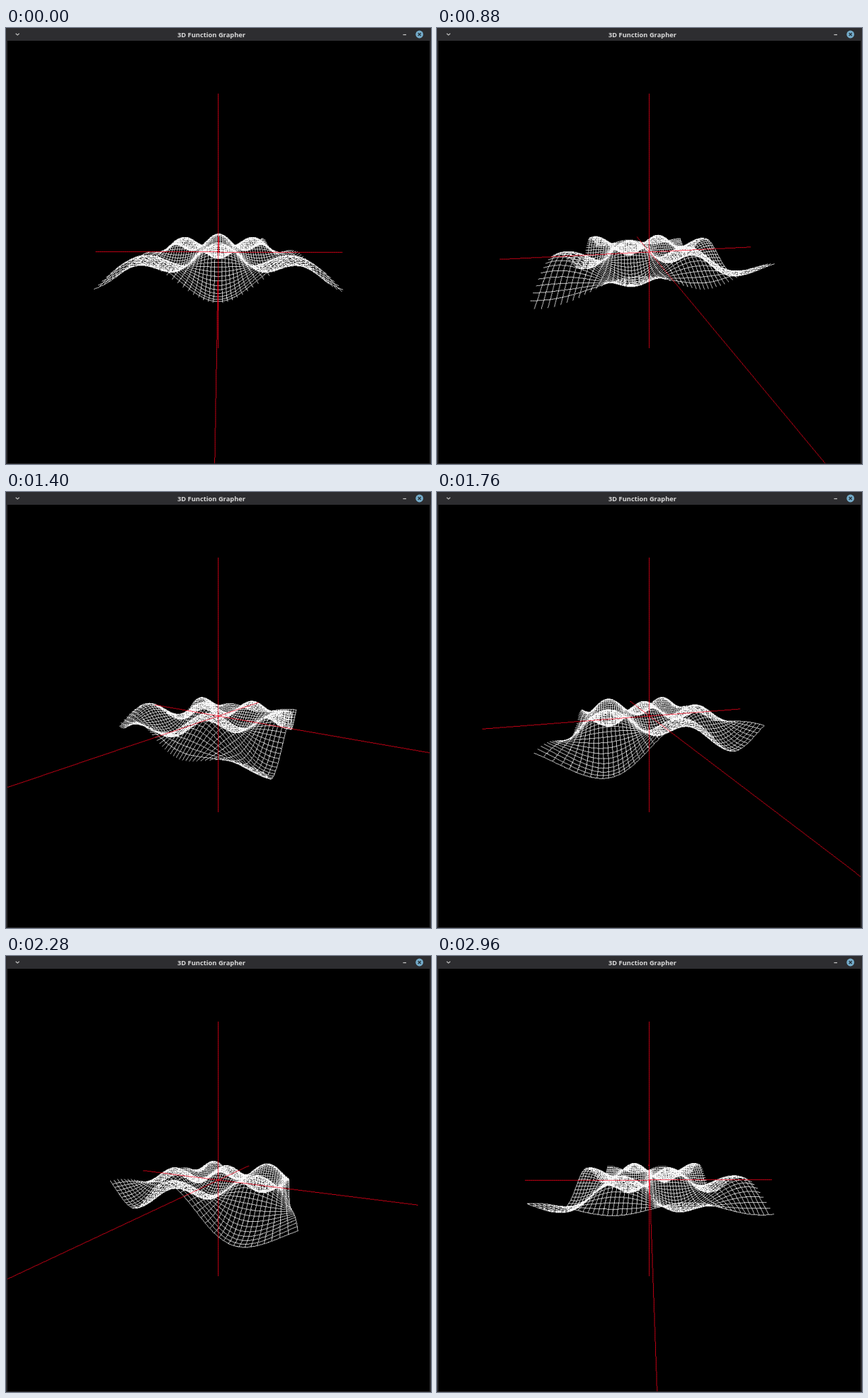
Animation of 600 by 615 pixels, one loop 3000 ms. Source, as an HTML page with a canvas:

```html
<!DOCTYPE html>
<html lang="en">
<head>
<meta charset="utf-8">
<title>3D Function Grapher</title>
<style>
  html, body { margin: 0; width: 100%; height: 100%; overflow: hidden; background: #2d2d30; }
  #stage { position: relative; width: 600px; height: 615px; overflow: hidden; background: #2d2d30; }
  canvas { position: absolute; left: 2px; top: 18px; }
  svg { position: absolute; left: 0; top: 0; }
  text { font: 700 9.3px "Open Sans", "Noto Sans", sans-serif; fill: #dadada; }
</style>
</head>
<body>
<div id="stage">
  <canvas id="view" width="596" height="596"></canvas>
  <svg width="600" height="18" viewBox="0 0 600 18">
    <path d="M13.7 7.8 L16.2 10 L18.7 7.8" fill="none" stroke="#bdbdbd" stroke-width="1.2"/>
    <text x="290" y="13" text-anchor="middle">3D Function Grapher</text>
    <path d="M560.5 9.5 H565" stroke="#c8c8c8" stroke-width="1.2"/>
    <circle cx="583.7" cy="9" r="5.4" fill="#74abc9"/>
    <path d="M581.7 7 l4 4 m0 -4 l-4 4" stroke="#26323a" stroke-width="1.3"/>
  </svg>
</div>
<script>
const LOOP = 3000, STEP = 40;
const SIZE = 596;              // size on the page
const GRID = 800;              // size the hard-edged lines are plotted at
const SCALE = SIZE / GRID;
const CX = GRID / 2 - 0.01, CY = GRID / 2;
const FOCAL = GRID / 2 / Math.tan(Math.PI / 3);
const DIST = 9.895, PITCH = Math.atan(0.25);
const SP = Math.sin(PITCH), CP = Math.cos(PITCH);
const EXTENT = 5, CELL = 0.2, CELLS = 50, AXIS = 10;
const WHITE = 1, RED = 2;
const RGB = { [WHITE]: [255, 255, 255], [RED]: [255, 0, 26] };

// Turn around the vertical axis: [ms, degrees]
const TURN = [[0, -0.25], [400, -36.85], [880, -78.59], [1400, -125.65],
              [1760, -162.3], [2280, -207.35], [2960, -269.5]];

const ctx = document.getElementById("view").getContext("2d");
const image = ctx.createImageData(SIZE, SIZE);
const sums = new Float32Array(SIZE * SIZE * 4);
const plot = new Uint8Array(GRID * GRID);

const height = (a, b) => Math.sin(a) * Math.cos(b);

function turnAt(ms) {
  let i = 1;
  while (i < TURN.length - 1 && ms > TURN[i][0]) i++;
  const [t0, d0] = TURN[i - 1], [t1, d1] = TURN[i];
  return (d0 + (d1 - d0) * (ms - t0) / (t1 - t0)) * Math.PI / 180;
}

function projector(turn) {
  const s = Math.sin(turn), c = Math.cos(turn);
  return (a, b, h) => {
    const x = a * s + b * c, z = a * c - b * s;
    const w = FOCAL / (DIST - z * CP - h * SP);
    return [CX + x * w, CY + (z * SP - h * CP) * w];
  };
}

function line(p, q, color) {
  const dx = q[0] - p[0], dy = q[1] - p[1];
  const n = Math.max(1, Math.ceil(Math.max(Math.abs(dx), Math.abs(dy))));
  for (let i = 0; i <= n; i++) {
    const x = Math.floor(p[0] + dx * i / n), y = Math.floor(p[1] + dy * i / n);
    if (x >= 0 && y >= 0 && x < GRID && y < GRID) plot[y * GRID + x] = color;
  }
}

function add(x, y, rgb, weight) {
  if (x < 0 || y < 0 || x >= SIZE || y >= SIZE) return;
  const at = (y * SIZE + x) * 4;
  for (let k = 0; k < 3; k++) sums[at + k] += rgb[k] * weight;
}

// Shrinks the plot to page size with a linear filter.
function shrink() {
  sums.fill(0);
  for (let at = 0; at < plot.length; at++) {
    if (!plot[at]) continue;
    const rgb = RGB[plot[at]];
    const x = (at % GRID + 0.5) * SCALE - 0.5;
    const y = (Math.floor(at / GRID) + 0.5) * SCALE - 0.5;
    const i = Math.floor(x), j = Math.floor(y), u = x - i, v = y - j;
    const k = SCALE * SCALE;
    add(i, j, rgb, (1 - u) * (1 - v) * k);
    add(i + 1, j, rgb, u * (1 - v) * k);
    add(i, j + 1, rgb, (1 - u) * v * k);
    add(i + 1, j + 1, rgb, u * v * k);
  }
  for (let at = 3; at < sums.length; at += 4) sums[at] = 255;
  image.data.set(sums);
}

function draw(ms) {
  const project = projector(turnAt(ms));
  plot.fill(0);

  const points = [];
  for (let i = 0; i <= CELLS + 1; i++) {
    points.push([]);
    for (let j = 0; j <= CELLS + 1; j++) {
      const a = i * CELL - EXTENT, b = j * CELL - EXTENT;
      points[i].push(project(a, b, height(a, b)));
    }
  }
  for (let i = 0; i <= CELLS; i++) {
    for (let j = 0; j <= CELLS; j++) {
      line(points[i][j], points[i + 1][j], WHITE);
      line(points[i][j], points[i][j + 1], WHITE);
    }
  }
  line(project(-AXIS, 0, 0), project(AXIS, 0, 0), RED);
  line(project(0, -AXIS, 0), project(0, AXIS, 0), RED);
  line(project(0, 0, -AXIS), project(0, 0, AXIS), RED);

  shrink();
  ctx.putImageData(image, 0, 0);
}

const start = performance.now();
let shown = -1;
function tick() {
  const ms = Math.floor((performance.now() - start) % LOOP / STEP) * STEP;
  if (ms !== shown) draw(shown = ms);
  requestAnimationFrame(tick);
}
tick();
</script>
</body>
</html>
```
